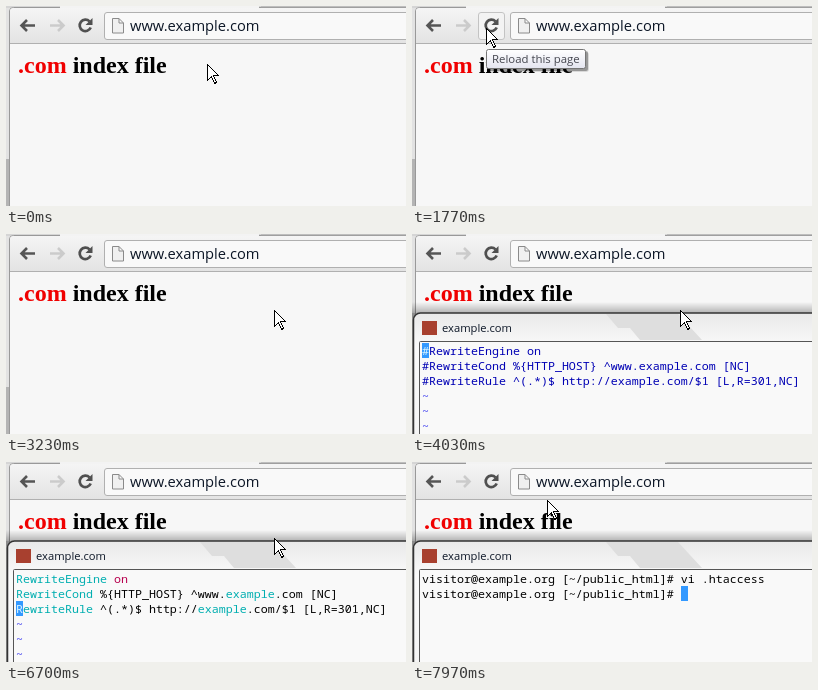
Write an HTML page that moves like this. It is 400 px wide and 200 px high and loops after 8000 ms.

```html
<!DOCTYPE html>
<html lang="en">
<head>
<meta charset="utf-8">
<title>Editing a redirect rule</title>
<style>
html, body { margin: 0; width: 100%; height: 100%; overflow: hidden; background: #f7f7f7; }
svg { display: block; width: 100vw; height: 100vh; }
text { white-space: pre; }
.ui { font-family: "Open Sans", "Noto Sans", sans-serif; fill: #0c1626; }
.heading { font: bold 24px "Liberation Serif", "Times New Roman", serif; }
.mono { font: 11.66px "Noto Sans Mono", "DejaVu Sans Mono", monospace; fill: #000; }
.note { fill: #0000b4; }
.key { fill: #00aeb0; }
.on { fill: #b8004e; }
.tilde { fill: #3d3df0; }
.lit { fill: #d8f4ff; }

.timed { animation: 8s step-end infinite; }
.hover { animation-name: hover; }
.press { animation-name: press; }
.tip { animation-name: tip; }
.terminal { animation-name: terminal; }
.editor { animation-name: editor; }
.shell { animation-name: shell; }
.raw1 { animation-name: raw1; }
.raw2 { animation-name: raw2; }
.raw3 { animation-name: raw3; }
.live1 { animation-name: live1; }
.live2 { animation-name: live2; }
.live3 { animation-name: live3; }
.caret { animation-name: caret; }
.hash { animation-name: hash; }
.letter { animation-name: letter; }
.pointer { animation-name: pointer; }

@keyframes hover { 0%, 29.62% { opacity: 0 } 5.37% { opacity: 1 } }
@keyframes press { 0%, 14.62% { opacity: 0 } 12.87% { opacity: 1 } }
@keyframes tip { 0%, 28.75% { opacity: 0 } 22.12% { opacity: 1 } }
@keyframes terminal { 0% { opacity: 0 } 41.25%, 100% { opacity: 1 } }
@keyframes editor { 0% { opacity: 1 } 84.62%, 100% { opacity: 0 } }
@keyframes shell { 0% { opacity: 0 } 84.62%, 100% { opacity: 1 } }
@keyframes raw1 { 0% { opacity: 1 } 53.75%, 100% { opacity: 0 } }
@keyframes raw2 { 0% { opacity: 1 } 62.12%, 100% { opacity: 0 } }
@keyframes raw3 { 0% { opacity: 1 } 67.12%, 100% { opacity: 0 } }
@keyframes live1 { 0% { opacity: 0 } 53.75%, 100% { opacity: 1 } }
@keyframes live2 { 0% { opacity: 0 } 62.12%, 100% { opacity: 1 } }
@keyframes live3 { 0% { opacity: 0 } 67.12%, 100% { opacity: 1 } }
@keyframes hash {
  0%, 59.62%, 65.37% { opacity: 1 }
  53.75%, 62.12%, 67.12%, 100% { opacity: 0 }
}
@keyframes letter {
  0%, 59.62%, 65.37% { opacity: 0 }
  53.75%, 62.12%, 67.12%, 100% { opacity: 1 }
}
@keyframes caret {
  0% { transform: translate(0, 0); opacity: 1 }
  59.62% { transform: translate(0, 15px); opacity: 1 }
  65.37% { transform: translate(0, 30px); opacity: 1 }
  68.75% { transform: translate(0, 30px); opacity: 0 }
  83.75%, 100% { transform: translate(0, 30px); opacity: 1 }
}
@keyframes pointer {
  0% { transform: translate(201px, 58px) }
  1.25% { transform: translate(196px, 57px) }
  2.12% { transform: translate(180px, 52px) }
  2.87% { transform: translate(156px, 45px) }
  3.75% { transform: translate(128px, 37px) }
  4.62% { transform: translate(104px, 30px) }
  5.37% { transform: translate(87px, 25px) }
  6.25% { transform: translate(78px, 23px) }
  7.12% { transform: translate(74px, 22px) }
  28.75% { transform: translate(82px, 27px) }
  29.62% { transform: translate(108px, 40px) }
  30.37% { transform: translate(160px, 58px) }
  31.25% { transform: translate(225px, 75px) }
  32.12% { transform: translate(285px, 85px) }
  32.87% { transform: translate(316px, 88px) }
  33.75% { transform: translate(320px, 88px) }
  34.62% { transform: translate(300px, 83px) }
  35.37% { transform: translate(278px, 78px) }
  36.25% { transform: translate(268px, 76px) }
  95.37% { transform: translate(262px, 74px) }
  96.25% { transform: translate(240px, 68px) }
  97.12% { transform: translate(208px, 59px) }
  97.87% { transform: translate(174px, 49px) }
  98.75% { transform: translate(148px, 42px) }
  99.62%, 100% { transform: translate(135px, 38px) }
}
</style>
</head>
<body>
<svg viewBox="0 0 400 200">
  <defs>
    <linearGradient id="bar" x2="0" y2="1">
      <stop stop-color="#f5f5f5"/><stop offset="1" stop-color="#e3e3e3"/>
    </linearGradient>
    <linearGradient id="tipFill" x2="0" y2="1">
      <stop stop-color="#fff"/><stop offset="1" stop-color="#e4e5f0"/>
    </linearGradient>
    <linearGradient id="titleFill" x2="0" y2="1">
      <stop stop-color="#e9e9e9"/><stop offset=".25" stop-color="#fafafa"/><stop offset="1" stop-color="#f4f4f4"/>
    </linearGradient>
    <linearGradient id="shade" x2="0" y2="1">
      <stop stop-color="#000" stop-opacity="0"/><stop offset="1" stop-color="#000" stop-opacity=".3"/>
    </linearGradient>
  </defs>

  <!-- Browser -->
  <rect width="400" height="200" fill="#e2e2e2"/>
  <rect width="400" height="2" fill="#d5d5d5"/>
  <rect y="153" width="3" height="47" fill="#b4b4b4"/>
  <path d="M3.500 201V5q0-3.500 4-3.500H401V201z" fill="#f7f7f7" stroke="#999"/>
  <path d="M4 37V5q0-3 4-3H400V37z" fill="url(#bar)"/>
  <path d="M54 1H253" stroke="#f3f3f3" stroke-width="2"/>
  <path d="M255 1H400" stroke="#a5a5a5"/>
  <path d="M4 37.500H400" stroke="#b0b0b0"/>
  <g fill="none" stroke-width="2.600">
    <path d="M29 19.500H16M21 14l-5.500 5.500 5.500 5.500" stroke="#555"/>
    <path d="M44 19.500H57M52 14l5.500 5.500-5.500 5.500" stroke="#cbcbcb"/>
  </g>
  <g class="timed hover">
    <rect x="66.500" y="6.500" width="26" height="27" rx="2.500" fill="#f3f3f3" stroke="#c3c3c3"/>
    <rect class="timed press" x="66.500" y="6.500" width="26" height="27" rx="2.500" fill="#d6d6d6" stroke="#999"/>
  </g>
  <path d="M83.500 15.400a5.700 5.700 0 1 0 1.200 6.100" fill="none" stroke="#505050" stroke-width="2.700"/>
  <path d="M86.500 12V19H79.500z" fill="#505050"/>
  <path d="M401 6.500H101q-2.500 0-2.500 2.500V31q0 2.500 2.500 2.500H401" fill="#f9f9f9" stroke="#b0b0b0"/>
  <path d="M106.500 12.500h6.500l4.500 4.500v10h-11zM113 12.500V17h4.500" fill="#f0f0f0" stroke="#8a8a8a"/>
  <text class="ui" x="124" y="25" font-size="14.700">www.example.com</text>
  <text class="heading" x="12" y="67"><tspan fill="#f00000">.com</tspan> index file</text>

  <g class="timed tip">
    <rect x="76" y="45" width="100" height="20" rx="2" fill="#000" opacity=".3"/>
    <rect x="77" y="46" width="100" height="20" rx="3" fill="#000" opacity=".12"/>
    <rect x="74.500" y="43.500" width="99" height="19" rx="2" fill="url(#tipFill)" stroke="#767676"/>
    <text class="ui" x="80" y="57" font-size="11.400" style="fill:#45464f">Reload this page</text>
  </g>

  <!-- Terminal -->
  <g class="timed terminal">
    <rect y="68" width="400" height="12" fill="url(#shade)"/>
    <rect y="79" width="3" height="121" fill="#8c8c8c"/>
    <rect x="1.500" y="79" width="420" height="140" rx="7" fill="url(#titleFill)" stroke="#333" stroke-width="1.500"/>
    <path d="M194 80H266L290 106H228L218 94H206z" fill="#dedede"/>
    <rect x="10" y="87" width="15" height="14" fill="#a8402f"/>
    <text class="ui" x="30" y="98" font-size="11.200">example.com</text>
    <rect x="7.500" y="107.500" width="420" height="120" rx="1" fill="#f9f9f9" stroke="#555"/>

    <g class="mono timed editor">
      <text class="note timed raw1" x="10" y="121">#RewriteEngine on</text>
      <text class="timed live1" x="10" y="121"><tspan class="key">RewriteEngine</tspan><tspan class="on"> on</tspan></text>
      <text class="note timed raw2" x="10" y="136">#RewriteCond %{HTTP_HOST} ^www.example.com [NC]</text>
      <text class="timed live2" x="10" y="136"><tspan class="key">RewriteCond</tspan> %{HTTP_HOST} ^www.<tspan class="key">example</tspan>.com [NC]</text>
      <text class="note timed raw3" x="10" y="151">#RewriteRule ^(.*)$ http://example.com/$1 [L,R=301,NC]</text>
      <text class="timed live3" x="10" y="151"><tspan class="key">RewriteRule</tspan> ^(.*)$ http://<tspan class="key">example</tspan>.com/$1 [L,R=301,NC]</text>
      <g class="tilde">
        <text x="10" y="166">~</text>
        <text x="10" y="181">~</text>
        <text x="10" y="196">~</text>
      </g>
      <g class="timed caret">
        <rect x="10" y="109" width="7" height="15" fill="#3399ff"/>
        <text class="lit timed hash" x="10" y="121">#</text>
        <text class="lit timed letter" x="10" y="121">R</text>
      </g>
    </g>

    <g class="mono timed shell">
      <text x="10" y="121">visitor@example.org [~/public_html]# vi .htaccess</text>
      <text x="10" y="136">visitor@example.org [~/public_html]#</text>
      <rect x="269" y="124" width="7" height="15" fill="#3399ff"/>
    </g>
  </g>

  <g class="timed pointer">
    <path d="M.5.5V16.500L4.500 12.500 7.500 19.500 9.500 18.500 6.500 11.500H11.500z" fill="#fff" stroke="#000" shape-rendering="crispEdges"/>
  </g>
</svg>
</body>
</html>
```
